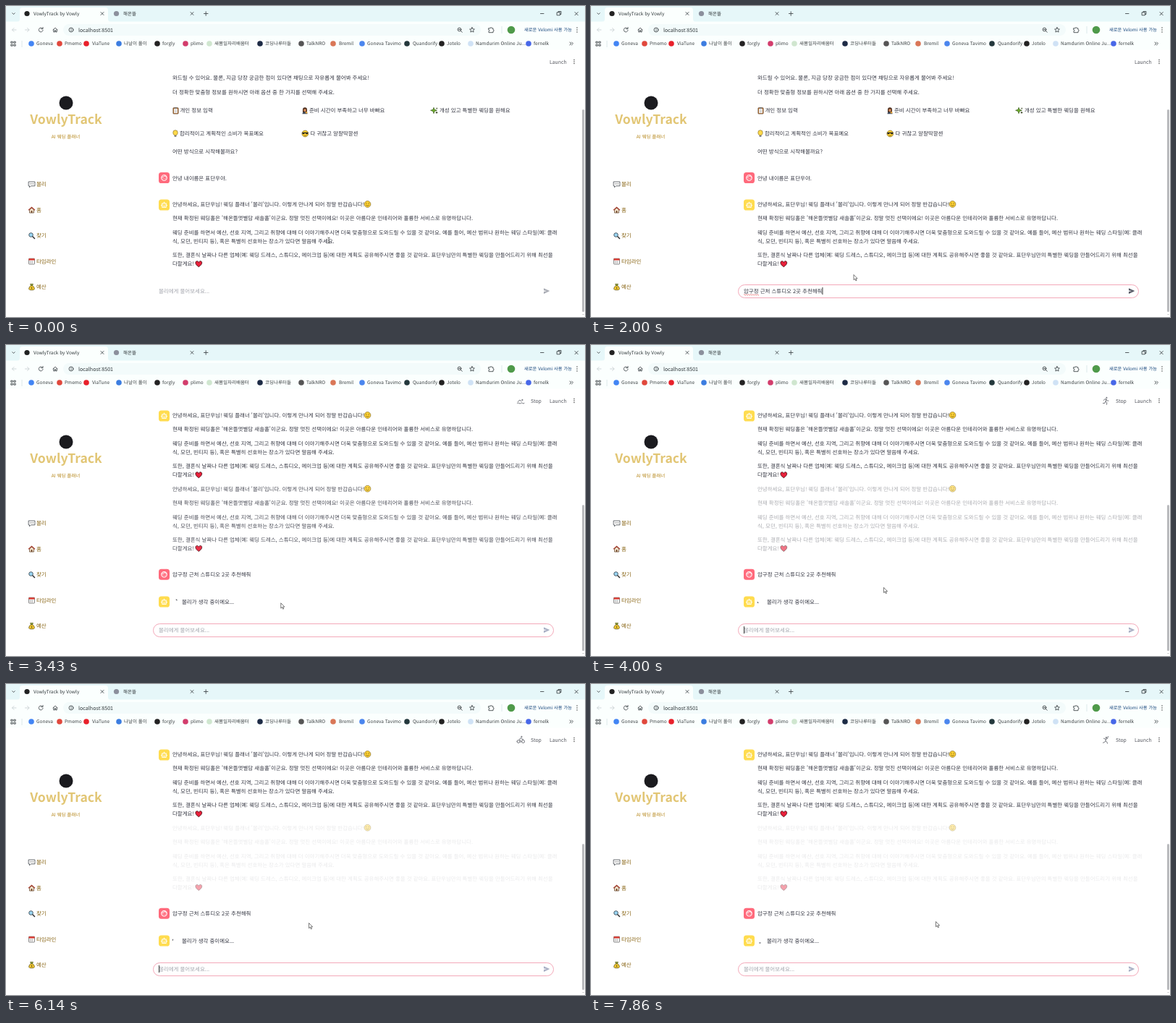
Write an HTML page that moves like this. It is 800 px wide and 430 px high and loops after 8000 ms.

```html
<!DOCTYPE html>
<html lang="ko">
<head>
<meta charset="utf-8">
<title>VowlyTrack</title>
<style>
html, body { margin: 0; width: 100%; height: 100%; overflow: hidden; background: #fff; }
svg { display: block; width: 800px; height: 430px; }
text { font-family: "Noto Sans CJK KR", "Noto Sans CJK", "Noto Sans", sans-serif; text-rendering: geometricPrecision; white-space: pre; }
.body { font-size: 7.46px; fill: #31333f; }
.menu { font-size: 7.46px; fill: #876312; }
.mark { font-size: 6.5px; fill: #3c4043; }
.tab { font-size: 6.5px; fill: #30373a; }
.url { font-size: 7.1px; fill: #30373a; }
.update { font-size: 6.3px; fill: #17457c; }
.head { font-size: 6.9px; fill: #55575f; }
.hint { font-size: 7.46px; fill: #a3a5ad; }
.brand { font-size: 17.6px; font-weight: 700; fill: #e2c675; text-anchor: middle; }
.sub { font-size: 6.5px; fill: #b5861a; text-anchor: middle; }
.line { fill: none; stroke: #444b4f; stroke-width: .9; stroke-linecap: round; stroke-linejoin: round; }
.pale { stroke: #cbd3d5; }
</style>
</head>
<body>
<svg viewBox="0 0 800 430">
  <defs>
    <clipPath id="view"><rect x="200" y="88" width="594" height="284"/></clipPath>
    <g id="face">
      <circle r="4.4" fill="#ffd233" stroke="#6b5518" stroke-width=".6"/>
      <path d="M-2.6-.8q.9-1.2 1.8 0M.8-.8q.9-1.2 1.8 0M-2.2 1.2q2.2 2.2 4.4 0" fill="none" stroke="#5c4512" stroke-width=".7"/>
    </g>
    <g id="cool">
      <circle r="4.4" fill="#ffd233" stroke="#6b5518" stroke-width=".6"/>
      <path d="M-4.2-1.8h8.4l-.6 2.2q-1.7 1.2-3-.9h-1.2q-1.3 2.1-3 .9z" fill="#222"/>
      <path d="M-1.8 2.3q2 1 3.8-.3" fill="none" stroke="#5c4512" stroke-width=".7"/>
    </g>
    <g id="heart">
      <path d="M0 4.2C-3 2-4.4.5-4.4-1.5C-4.4-4.3-1-4.6 0-2C1-4.6 4.4-4.3 4.4-1.5C4.4.5 3 2 0 4.2Z" fill="#e8203a" stroke="#3a1015" stroke-width=".8"/>
    </g>
    <g id="clip">
      <rect x="-3.6" y="-4" width="7.2" height="8.4" rx=".8" fill="#b5743a" stroke="#4a3018" stroke-width=".6"/>
      <path d="M-2.4-2.6h4.8v6h-4.8z" fill="#fff"/>
      <path d="M-1.5-1h3M-1.5.6h3M-1.5 2.2h3" stroke="#888" stroke-width=".5"/>
      <path d="M-1.5-4.6h3v1.8h-3z" fill="#777"/>
    </g>
    <g id="woman">
      <path d="M-3 2.5V-1.5a3 3 0 0 1 6 0v4z" fill="#4b2c1c"/>
      <path d="M-3.6 4.5q.4-3 3.6-3t3.6 3z" fill="#3f4c60"/>
      <circle cy="-.6" r="1.9" fill="#d98e5f"/>
      <circle cx="2" cy="2.6" r="1.4" fill="#e0a13a"/>
    </g>
    <g id="spark">
      <path d="M-1-4.4l1.2 3 3.2 1-3.2 1.2-1.2 3.2-1.2-3.2-3.2-1.2 3.2-1z" fill="#6fae2c" stroke="#2f4d16" stroke-width=".6"/>
      <path d="M3 .8l.6 1.2 1.2.6-1.2.6L3 4.4l-.6-1.2-1.2-.6 1.2-.6zM3.2-4.4l.4 1 1 .4-1 .4-.4 1-.4-1-1-.4 1-.4z" fill="#333f1d"/>
    </g>
    <g id="bulb">
      <path d="M-1.5 2.2Q-3.4.4-3.2-1.6a3.2 3.2 0 0 1 6.4 0Q3.4.4 1.5 2.2z" fill="#ffd94a" stroke="#7a6320" stroke-width=".6"/>
      <path d="M-1.4 2.5h2.8v1.8h-2.8z" fill="#777"/>
    </g>
    <g id="talk">
      <path d="M-4.4-3.5h8.8v5.8H-1l-2 2v-2h-1.4z" fill="#fff" stroke="#454a50" stroke-width=".8"/>
      <path d="M-2.4-.6h.9M-.4-.6h.9M1.6-.6h.9" stroke="#333" stroke-width="1"/>
    </g>
    <g id="house">
      <path d="M-3 0v4h6v-4L0-3z" fill="#f4e5cd" stroke="#5a3a22" stroke-width=".7"/>
      <path d="M-4.4.3L0-3.7 4.4.3" fill="none" stroke="#a43a2a" stroke-width="1.2"/>
      <path d="M-.9 1h1.8v3h-1.8z" fill="#6b4226"/>
    </g>
    <g id="glass">
      <path d="M.8.8l3.2 3.2" stroke="#333" stroke-width="1.5" stroke-linecap="round"/>
      <circle cx="-1" cy="-1" r="2.8" fill="#9ad5f2" stroke="#3b4750" stroke-width=".9"/>
    </g>
    <g id="cal">
      <rect x="-4" y="-3.8" width="8" height="7.8" rx=".7" fill="#fff" stroke="#555" stroke-width=".7"/>
      <path d="M-4-3.8h8v2.4h-8z" fill="#d8382f"/>
      <path d="M-2.6.2h5.2M-2.6 2h5.2" stroke="#777" stroke-width=".9" stroke-dasharray="1 .7"/>
    </g>
    <g id="bag">
      <path d="M-1.5-1.8Q-4.2.6-3.9 2.8-3.6 4.3 0 4.3T3.9 2.8Q4.2.6 1.5-1.8z" fill="#efc835" stroke="#5d4c14" stroke-width=".7"/>
      <path d="M-2-4.2h4l-.7 2.2h-2.6z" fill="#7f9c3a" stroke="#5d4c14" stroke-width=".5"/>
      <path d="M0 0v3M-1 1.4h2" stroke="#6b5510" stroke-width=".7"/>
    </g>
    <g id="user">
      <rect x="-7.5" y="-7.5" width="15" height="15" rx="3.6" fill="#ff6a7c"/>
      <circle r="3.7" fill="none" stroke="#fff" stroke-width="1.1"/>
      <path d="M-3.4-.8Q0-.6 1-3 1.6-1 3.5-1" fill="none" stroke="#fff" stroke-width=".9"/>
      <path d="M-1.3.9v.1M1.3.9v.1" stroke="#fff" stroke-width="1" stroke-linecap="round"/>
    </g>
    <g id="bot">
      <rect x="-7.5" y="-7.5" width="15" height="15" rx="3.6" fill="#ffdc4f"/>
      <path d="M-2.8-2.2h5.6v5.6h-5.6zM0-2.2v-2M-4.4.6h1.4M3 .6h1.4" fill="none" stroke="#fff" stroke-width="1"/>
      <path d="M-1.2-.2v.1M1.2-.2v.1M-1.2 1.8h2.4" stroke="#fff" stroke-width=".9" stroke-linecap="round"/>
    </g>
  </defs>

  <rect width="800" height="430" fill="#fff"/>
  <g id="bars">
    <rect width="800" height="22" fill="#e6f7f9"/>
    <path d="M15 22q4 0 4-4V6q0-4 4-4h114q4 0 4 4v12q0 4 4 4z" fill="#fbfffe"/>
    <rect y="21.5" width="800" height="39" fill="#fbfffe"/>
    <rect x="79" y="25" width="577" height="16" rx="8" fill="#f3fbfb"/>
    <circle cx="29" cy="10.5" r="3.6" fill="#222"/>
    <circle cx="152.5" cy="10.5" r="3.6" fill="#8b8f9c"/>
    <g class="line">
      <path d="M8.8 9.8l1.7 1.7 1.7-1.7M131 8.500l4 4m0-4l-4 4M255 8.500l4 4m0-4l-4 4M273.500 10.500h5.500M276.200 7.800v5.500"/>
      <path d="M738.500 10.500h4.500M761.500 8.800h4v4h-4zM763 8.800v-1.300h4v4h-1.300M786 8.500l4.300 4.300m0-4.300l-4.300 4.300"/>
      <path class="pale" d="M14 33H8.500m2.500-2.500L8.500 33l2.500 2.500M26.500 33H32m-2.500-2.500L32 33l-2.500 2.500"/>
      <path d="M50.500 31.200a2.900 2.900 0 1 0 .6 2.300M51 29.500v2.200h-2.200M65 33l3-2.800L71 33M65.800 32.500v3.500h1.500v-2.200h1.400V36h1.500v-3.500"/>
      <circle cx="90" cy="33" r="3"/><path d="M90 32.800v1.600M90 31.400v.1"/>
      <circle cx="626.5" cy="32.5" r="2.4"/><path d="M628.300 34.300l2 2M625.500 32.500h2"/>
      <path d="M644 29.600l1 2.200 2.400.3-1.800 1.600.5 2.400-2.100-1.200-2.100 1.200.5-2.400-1.800-1.600 2.400-.3z"/>
      <path d="M667 30.800h2.100a1.100 1.100 0 0 1 2.200 0h1.700v2a1.100 1.100 0 0 1 0 2.200v1.700h-6v-2a1 1 0 0 0 0-2z"/>
      <path d="M7.200 49.200h2v2h-2zm4 0h2v2h-2zm-4 4h2v2h-2zm4 0h2v2h-2z"/>
      <path d="M779 50l2 2-2 2m2.500-4l2 2-2 2"/>
    </g>
    <path d="M22 48v9M685 28v10" stroke="#d6e4e6" stroke-width=".8"/>
    <circle cx="698" cy="33" r="5.3" fill="#4f9a4a"/>
    <path d="M789 30v.1M789 33v.1M789 36v.1M785 74.500v.1M785 77v.1M785 79.500v.1" stroke="#444" stroke-width="1.5" stroke-linecap="round"/>
  </g>

  <g clip-path="url(#view)"><g id="chat">
    <g id="dup"><g id="dupText"></g><g id="dupEmoji"></g></g>
  </g></g>
  <g id="side"><circle cx="83" cy="134" r="9.5" fill="#1b1b1f"/></g>

  <g id="status">
    <path id="pose" fill="none" stroke="#666870" stroke-width=".9" stroke-linecap="round" stroke-linejoin="round"/>
    <text class="head" x="725" y="79.7">Stop</text>
  </g>
  <path id="spin" d="M3.100-1.100A3.300 3.300 0 0 1 3.100 1.100" fill="none" stroke="#44464f" stroke-width="1"/>

  <rect id="box" x="203.5" y="385.5" width="553" height="18" rx="9" fill="#fff" stroke="#f2a0b2" stroke-width=".9"/>
  <text id="hint" class="hint" x="211" y="396.9">볼리에게 물어보세요...</text>
  <text id="typed" class="body" x="211" y="396.9"></text>
  <path id="wave" d="M211 399.300q.75-1.300 1.500 0t1.500 0 1.500 0 1.500 0 1.500 0 1.500 0 1.500 0 1.500 0 1.500 0 1.500 0 1.500 0 1.500 0 1.500 0 1.500 0" fill="none" stroke="#e03a3a" stroke-width=".6"/>
  <rect id="caret" y="389" width=".9" height="10" fill="#222"/>
  <path id="send" d="M743 390.300l8.300 3.800-8.300 3.800v-3l4.500-.8-4.500-.8z"/>
  <rect id="thumb" x="796" width="3" rx="1.5" fill="#b9babd"/>
  <rect x="796.5" y="426" width="2" height="1" fill="#c4c4c4"/>
  <g id="mouse">
    <path id="arrow" d="M0 0V7.200L1.700 5.700 2.900 8.400 4 7.900 2.900 5.300H5.100Z" fill="#fff" stroke="#333" stroke-width=".65"/>
    <path id="beam" d="M-1.500-4q1.500 0 1.500 1v6q0 1-1.500 1M1.500-4Q0-4 0-3M1.500 4Q0 4 0 3" fill="none" stroke="#333" stroke-width=".7"/>
  </g>
</svg>
<script>
const $ = id => document.getElementById(id);
const put = (id, html) => $(id).insertAdjacentHTML("beforeend", html);
// y is the middle of the line
const text = (x, y, str, cls = "body", drop = 2.8) => `<text class="${cls}" x="${x}" y="${y + drop}">${str}</text>`;
const icon = (x, y, name) => `<use href="#${name}" x="${x}" y="${y}"/>`;

const bookmarks = [
  [35, "#4285f4", 42, "Goneva"], [74, "#e0483c", 81, "Pmemo"], [111, "#e8202a", 119, "ViaTune"],
  [156, "#3b7de0", 163, "나날이 풀이"], [209, "#222", 216, "forgly"], [248, "#d23d6c", 255, "plimo"],
  [281, "#cfe6cf", 288, "새봄일자리배움터"], [351, "#1c2b45", 358, "코딩나루터들"], [408, "#555", 415, "TalkNRO"],
  [452, "#d97757", 460, "Bremil"], [492, "#4a86ee", 499, "Goneva Tavimo"], [554, "#23383c", 562, "Quandorify"],
  [602, "#222", 609, "Jotelo"], [642, "#cfe2f5", 649, "Namdurim Online Ju..."], [722, "#4767e8", 729, "fernelk"]
];
put("bars", bookmarks.map(([ix, color, x, name]) =>
  `<circle cx="${ix}" cy="52" r="3.8" fill="${color}"/>` + text(x, 52, name, "mark", 2.3)).join("") +
  text(38, 10.5, "VowlyTrack by Vowly", "tab", 2.4) + text(162, 10.5, "해온뜰", "tab", 2.4) +
  text(100, 33, "localhost:8501", "url", 2.5) + text(716, 33, "새로운 Velomi 사용 가능", "update", 2.3) +
  text(751, 77, "Launch", "head", 2.7));

const menu = [["talk", "볼리"], ["house", "홈"], ["glass", "찾기"], ["cal", "타임라인"], ["bag", "예산"]];
put("side", text(83, 157, "VowlyTrack", "brand", 6) + text(82.5, 181, "AI 웨딩 플래너", "sub", 2.4) +
  menu.map(([name, label], i) => icon(35.5, 246.5 + i * 35.5, name) + text(42, 246.3 + i * 35.5, label, "menu")).join(""));

const reply = [
  [0, "안녕하세요, 표단우님! 웨딩 플래너 '볼리'입니다. 이렇게 만나게 되어 정말 반갑습니다!"],
  [19.5, "현재 확정된 웨딩홀은 '해온뜰앳별담 새솔홀'이군요. 정말 멋진 선택이에요! 이곳은 아름다운 인테리어와 훌륭한 서비스로 유명하답니다."],
  [39, "웨딩 준비를 하면서 예산, 선호 지역, 그리고 취향에 대해 더 이야기해주시면 더욱 맞춤형으로 도와드릴 수 있을 것 같아요. 예를 들어, 예산 범위나 원하는 웨딩 스타일(예: 클래"],
  [51, "식, 모던, 빈티지 등), 혹은 특별히 선호하는 장소가 있다면 말씀해 주세요."],
  [70.5, "또한, 결혼식 날짜나 다른 업체(예: 웨딩 드레스, 스튜디오, 메이크업 등)에 대한 계획도 공유해주시면 좋을 것 같아요. 표단우님만의 특별한 웨딩을 만들어드리기 위해 최선을"],
  [82.5, "다할게요!"]
];
const replyText = y => reply.map(([dy, str]) => text(230, y + dy, str)).join("");
const replyEmoji = y => icon(499.5, y, "face") + icon(266.3, y + 82.5, "heart");

const question = "압구정 근처 스튜디오 2곳 추천해줘";
put("chat",
  text(230, 99.3, "와드릴 수 있어요. 물론, 지금 당장 궁금한 점이 있다면 채팅으로 자유롭게 물어봐 주세요!") +
  text(230, 119, "더 정확한 맞춤형 정보를 원하시면 아래 옵션 중 한 가지를 선택해 주세요.") +
  icon(234.5, 144.7, "clip") + text(240.5, 144.5, "개인 정보 입력") +
  icon(413, 144.7, "woman") + text(419, 144.5, "준비 시간이 부족하고 너무 바빠요") +
  icon(592, 144.7, "spark") + text(599, 144.5, "개성 있고 특별한 웨딩을 원해요") +
  icon(234, 176.5, "bulb") + text(240, 176.3, "합리적이고 계획적인 소비가 목표예요") +
  icon(413.3, 176.5, "cool") + text(420.5, 176.3, "다 귀찮고 알잘딱깔센") +
  text(230, 201.5, "어떤 방식으로 시작해볼까요?") +
  icon(218.5, 237.5, "user") + text(230, 238, "안녕 내이름은 표단우야.") +
  icon(218.5, 275, "bot") + replyText(274) + replyEmoji(274));
put("dupText", replyText(375.7));
put("dupEmoji", replyEmoji(375.7));
put("dup", icon(218.5, 494.3, "user") + text(230, 494.5, question) +
  icon(218.5, 532, "bot") + text(243, 532, "볼리가 생각 중이에요..."));

// Every state the input passes through while Hangul is composed
const initials = "ㄱㄲㄴㄷㄸㄹㅁㅂㅃㅅㅆㅇㅈㅉㅊㅋㅌㅍㅎ";
const strokes = [""];
[...question].forEach((ch, i) => {
  const done = question.slice(0, i), c = ch.charCodeAt(0) - 0xac00;
  if (c >= 0) {
    strokes.push(done + initials[c / 588 | 0]);
    if (c % 28) strokes.push(done + String.fromCharCode(0xac00 + c - c % 28));
  }
  strokes.push(done + ch);
});

const head = (x, y) => `M${x - .7} ${y}a.7.7 0 1 0 1.400 0a.7.7 0 1 0-1.400 0`;
const poses = [
  head(712.5, 73) + "M708.500 76.500l1.300-1.700 2.200.3-1 3 1.800 1.500-.3 2.700M711 78l-1 2.300-2.500.2M712 75.200l1.200 1.800 1.800.1",
  head(712, 74) + "M714.500 72.500l-1 3-2.500.8-2.500-1M711.500 76.200l-.6 2.500 2 1.500.6 2M710.900 78.700l-1.400 1.800-2 .7",
  head(713.5, 76) + "M707 78.500l3-2.500 2 2M706.500 80.500q1.200-1.200 2.400 0t2.400 0 2.400 0 2.400 0",
  head(712.5, 73) + "M706 79.500a2 2 0 1 0 4 0a2 2 0 1 0-4 0M712.500 79.500a2 2 0 1 0 4 0a2 2 0 1 0-4 0M711 80.500v-2.300l-1.800-1.600 2.300-2 1.300 1.700h1.700"
];

// Piecewise linear track of [time, value] points
function track(t, points) {
  const i = points.findIndex(p => p[0] > t);
  if (i < 0) return points[points.length - 1][1];
  if (!i) return points[0][1];
  const [t0, a] = points[i - 1], [t1, b] = points[i];
  return a + (b - a) * (t - t0) / (t1 - t0);
}
const mouseX = [[0, 446], [140, 446], [480, 384], [900, 370], [1200, 363], [3140, 363], [3860, 404.5], [5000, 404.5], [6140, 418.5], [7860, 476.5]];
const mouseY = [[0, 324], [140, 324], [480, 393], [900, 395], [1200, 371.5], [3140, 371.5], [3860, 335], [5000, 337], [6140, 330.5], [7860, 328.5]];

const show = (id, on) => $(id).setAttribute("visibility", on ? "visible" : "hidden");
const set = (id, name, value) => $(id).setAttribute(name, value);
const FOCUS = 570, TYPE = 650, STROKE = 34, SENT = 2570, GROWN = 2850, BUSY = 3270;

function draw(t) {
  const k = Math.min(Math.max((t - GROWN) / 410, 0), 1);
  const scroll = 177 * (1 - (1 - k) ** 2);
  const grown = t >= GROWN, busy = t >= BUSY;
  set("chat", "transform", `translate(0 ${-scroll})`);
  $("dup").style.display = grown ? "" : "none";
  set("dupText", "opacity", track(t, [[3300, 1], [4000, .4], [4600, .1]]));
  set("dupEmoji", "opacity", track(t, [[3300, 1], [4000, .62], [4600, .42]]));
  set("thumb", "y", grown ? 122.2 + .5585 * scroll : 143);
  set("thumb", "height", grown ? 202 : 280);

  const n = Math.min(Math.max(Math.floor((t - TYPE) / STROKE), 0), strokes.length - 1);
  const typed = t < SENT ? strokes[n] : "";
  $("typed").textContent = typed;
  show("hint", !typed);
  show("wave", typed.length > 3);
  set("box", "stroke-opacity", t < FOCUS ? 0 : 1);
  set("send", "fill", typed ? "#565965" : t < SENT ? "#a9acb4" : "#a9afc4");
  const typing = typed && t < 2200;
  show("caret", t >= FOCUS && (typing || (t - SENT + 5300) % 1060 < 530));
  set("caret", "x", 211 + (typed ? $("typed").getComputedTextLength() : 0));

  show("status", busy);
  show("spin", busy);
  set("pose", "d", poses[Math.floor((t - 4000 + 2280) / 285) & 3]);
  set("spin", "transform", `translate(233.5 354.7) rotate(${155 + (t - 4000) / 1010 * 360})`);

  set("mouse", "transform", `translate(${track(t, mouseX)} ${track(t, mouseY)})`);
  show("beam", t < 1100);
  show("arrow", t >= 1100);
}

const start = performance.now();
function tick() {
  draw((performance.now() - start) % 8000);
  requestAnimationFrame(tick);
}
tick();
</script>
</body>
</html>
```
